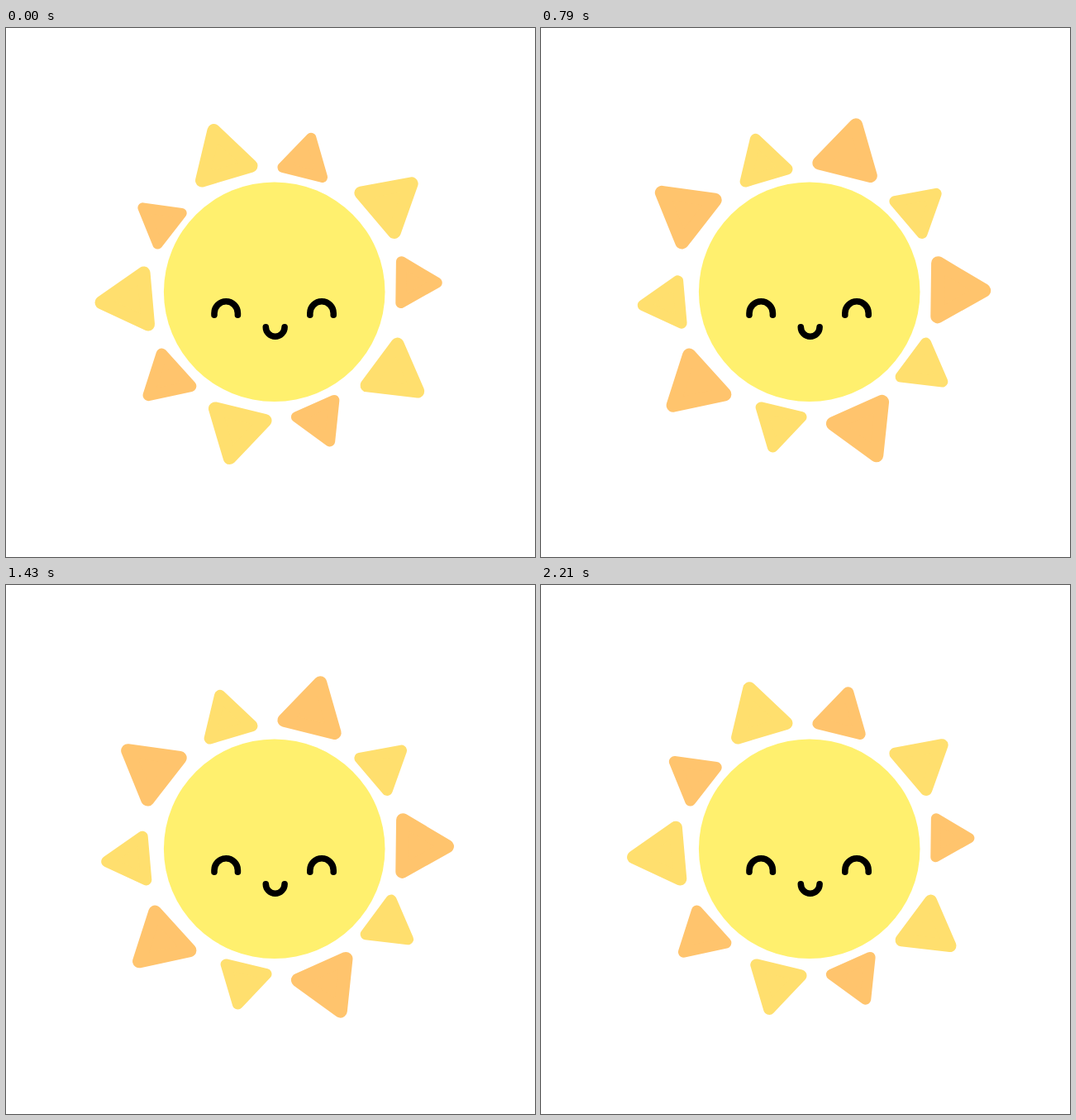
Animation of 640 by 640 pixels, one loop 2.28 s. Source, as an HTML page:

```html
<!DOCTYPE html>
<html lang="en">
<head>
<meta charset="utf-8">
<title>Smiling sun</title>
<style>
  html, body { margin: 0; width: 100%; height: 100%; overflow: hidden; background: #fff; }
  svg { display: block; width: 100%; height: 100%; }
</style>
</head>
<body>
<svg viewBox="0 0 640 640">
  <g id="rays" stroke-linejoin="round"></g>
  <ellipse cx="324.7" cy="319.3" rx="133.8" ry="132.8" fill="#fff06e"/>
  <g fill="none" stroke="#000" stroke-width="7.6" stroke-linecap="round">
    <path d="M252 347.3V345a14.2 14.2 0 0 1 28.4 0v2.3"/>
    <path d="M367.8 347.3V345a14.2 14.2 0 0 1 28.4 0v2.3"/>
    <path d="M314.3 361.8a11.4 11.4 0 0 0 22.8 0"/>
  </g>
</svg>
<script>
const LOOP = 2280;
const STEPS = 32;
const ROUNDING = 0.224; // corner radius relative to the circumradius
const YELLOW = '#ffdf6e';
const ORANGE = '#ffc46d';

// Each ray keeps one corner of its bounding box in place while it grows and shrinks.
// side: 1 pins the right or bottom edge, -1 the left or top edge.
// sizes: circumradius at the start, the middle and the end of the loop.
const rays = [
  { color: YELLOW, angle: 13.4, pin: [304.5, 192.5], side: [1, 1],   sizes: [35.8, 29.8, 35.3] },
  { color: ORANGE, angle: 44,   pin: [328.4, 187],   side: [-1, 1],  sizes: [28.5, 37.6, 30.2] },
  { color: YELLOW, angle: 79.6, pin: [421.4, 255],   side: [-1, 1],  sizes: [35.9, 28.8, 33.1] },
  { color: ORANGE, angle: 0.7,  pin: [471.3, 276.2], side: [-1, -1], sizes: [28.8, 38, 27.1] },
  { color: YELLOW, angle: 36.6, pin: [428.6, 374.6], side: [-1, -1], sizes: [35.8, 28.8, 34.1] },
  { color: ORANGE, angle: 66,   pin: [344.9, 443.9], side: [-1, -1], sizes: [28.8, 38.3, 29.4] },
  { color: YELLOW, angle: 103.5, pin: [321.5, 452.4], side: [1, -1], sizes: [35.9, 28.4, 32] },
  { color: ORANGE, angle: 17.8, pin: [230.4, 387.6], side: [1, -1],  sizes: [30.3, 37.4, 30.1] },
  { color: YELLOW, angle: 55,   pin: [176.3, 363.5], side: [1, 1],   sizes: [35.9, 29.1, 35.8], drift: [3.7, 3] },
  { color: ORANGE, angle: 97.9, pin: [218.7, 267.6], side: [1, 1],   sizes: [27.4, 38.3, 29.5] }
];

const group = document.getElementById('rays');
for (const ray of rays) {
  const corners = [0, 120, 240].map(turn => {
    const a = (ray.angle + turn) * Math.PI / 180;
    return [Math.cos(a), Math.sin(a)];
  });
  // Shift the unit triangle so that its pinned box corner sits at the origin.
  const edge = ray.side.map((side, axis) =>
    side * (Math.max(...corners.map(c => side * c[axis])) + ROUNDING));
  ray.corners = corners.map(c => c.map((v, axis) => v - edge[axis]));
  ray.node = document.createElementNS('http://www.w3.org/2000/svg', 'polygon');
  ray.node.setAttribute('fill', ray.color);
  ray.node.setAttribute('stroke', ray.color);
  group.append(ray.node);
}

function ease(time, from, to) {
  const p = Math.min(1, Math.max(0, (time - from) / (to - from)));
  return (1 - Math.cos(Math.PI * p)) / 2;
}

// Steps last 70 ms, every seventh one 80 ms.
const stepStart = i => 70 * i + 10 * Math.floor((i + 3) / 7);

function stepTime(time) {
  let i = STEPS - 1;
  while (i > 0 && stepStart(i) > time) i--;
  return stepStart(i);
}

function draw(time) {
  const out = ease(time, 25, 965);
  const back = ease(time, 1130, 2220);
  for (const { node, corners, pin, sizes: [start, middle, end], drift = [0, 0] } of rays) {
    const size = start + (middle - start) * out + (end - middle) * back;
    const points = corners.map(c =>
      c.map((v, axis) => (pin[axis] + drift[axis] * (1 - out) + v * size).toFixed(2)));
    node.setAttribute('points', points.join(' '));
    node.setAttribute('stroke-width', 2 * ROUNDING * size);
  }
}

const begin = performance.now();
function tick() {
  draw(stepTime((performance.now() - begin) % LOOP));
  requestAnimationFrame(tick);
}
tick();
</script>
</body>
</html>
```
